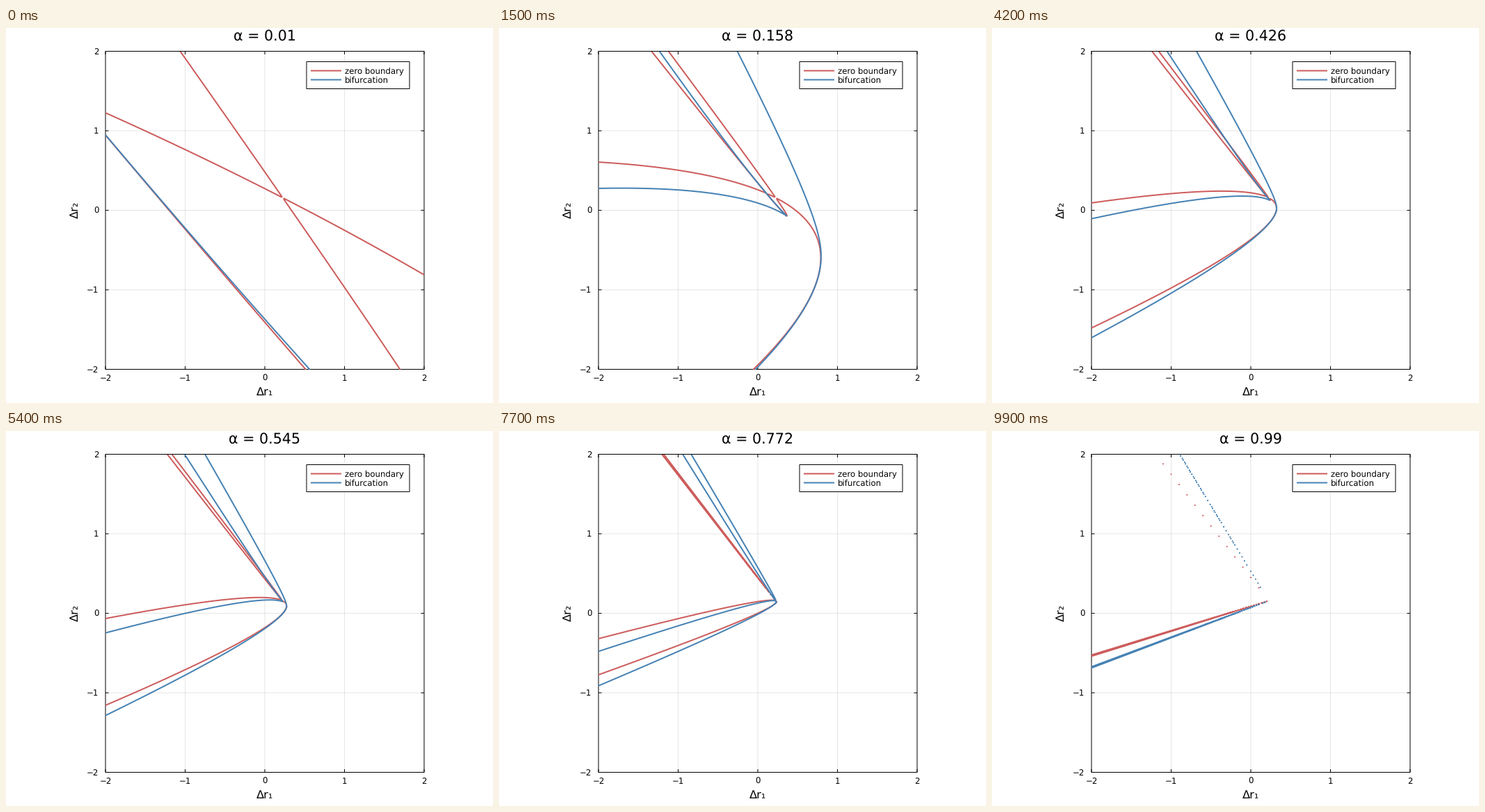
A matplotlib script that plays this animation: 700 px wide and 540 px high, repeating every 10000 ms.

```python
import matplotlib.pyplot as plt
import numpy as np
from matplotlib.animation import FuncAnimation
from matplotlib.collections import LineCollection
from matplotlib.patches import Rectangle

W, H, DPI = 700, 540, 100
RED, BLUE = "indianred", "steelblue"
FRAMES = 100
ALPHAS = np.linspace(0.01, 0.99, FRAMES)

# Quadratic map: P = P0 + S (U1 s + W1 s^2 + U2 t + W2 t^2 + Z s t)
P0 = np.array([0.225, 0.1576])
U1, W1 = np.array([0.3602, -0.52]), np.array([-1.0, 1.3])
U2, W2 = np.array([0.7114, -0.3657]), np.array([-1.0, -0.31])
Z = np.array([-1.147, 0.236])

grid = np.linspace(-2, 2, 401)
X, Y = np.meshgrid(grid, grid)
DX, DY = X - P0[0], Y - P0[1]


def cross(a, b):
    return a[0] * b[1] - a[1] * b[0]


def parabola(u, w, scale):
    """Implicit form of P0 + scale (u t + w t^2)."""
    d = (DX, DY)
    return cross(w, d) ** 2 + scale * cross(w, u) * cross(u, d)


def mul(*polys):
    out = np.array([1.0])
    for p in polys:
        out = np.polymul(out, p)
    return out


# Pencil of the two conics, as polynomials in the pencil parameter
DET = mul(W1, W2) - mul(Z, Z) / 4
LIN = (mul(U1, U1, W2) - mul(U1, U2, Z) + mul(U2, U2, W1)) / 4


def tangency(scale):
    """Discriminant of the pencil's cubic: zero where two solutions merge."""
    q = scale * LIN
    a = -DET[0] * DX - q[0]
    b = -DET[0] * DY - DET[1] * DX - q[1]
    c = -DET[1] * DY - DET[2] * DX - q[2]
    d = -DET[2] * DY - q[3]
    ac, bd, ad = a * c, b * d, a * d
    bc = b * c
    return 18 * ad * bc - 4 * b * b * bd + bc * bc - 4 * ac * c * c - 27 * ad * ad


plt.rcParams.update({"font.family": "DejaVu Sans", "text.hinting": "none"})
fig = plt.figure(figsize=(W / DPI, H / DPI), dpi=DPI, facecolor="white")

LEFT, TOP, SIDE = 143, 33.5, 458
RIGHT, BOTTOM = LEFT + SIDE, TOP + SIDE
UNIT = SIDE / 4
MID_X, MID_Y = LEFT + SIDE / 2, TOP + SIDE / 2
TICK = 4.5


def px(n):
    """Pixels to points."""
    return n * 72 / DPI


def canvas(z):
    """Full-stage axes measured in pixels from the top left."""
    c = fig.add_axes([0, 0, 1, 1], zorder=z)
    c.set_xlim(0, W)
    c.set_ylim(H, 0)
    c.axis("off")
    return c


def line(c, x, y, color="black", width=1, **kw):
    c.plot(x, y, color=color, linewidth=px(width), solid_capstyle="butt",
           snap=False, **kw)


def box(c, x, y, w, h, fill):
    c.add_patch(Rectangle((x, y), w, h, facecolor=fill, edgecolor="black",
                          linewidth=px(1), snap=False, zorder=1))


def label(c, x, y, s, size, **kw):
    return c.text(x, y, s, fontsize=px(size), va="baseline", **kw)


# Frame, grid, ticks and labels
base = canvas(0)
box(base, LEFT, TOP, SIDE, SIDE, "white")
for v in range(-2, 3):
    x, y = MID_X + v * UNIT, MID_Y - v * UNIT
    if abs(v) < 2:
        line(base, [x, x], [TOP, BOTTOM], alpha=0.1)
        line(base, [LEFT, RIGHT], [y, y], alpha=0.1)
    for edge, inner in [(TOP, TOP + TICK), (BOTTOM, BOTTOM - TICK)]:
        line(base, [x, x], [edge, inner])
    for edge, inner in [(LEFT, LEFT + TICK), (RIGHT, RIGHT - TICK)]:
        line(base, [edge, inner], [y, y])
    s = str(v).replace("-", "\u2212")
    label(base, x, 507.6, s, 11.8, ha="center")
    label(base, 133.5, y + 4.1, s, 11.8, ha="right")
label(base, MID_X, 529, "Δr₁", 16.2, ha="center")
label(base, 104, MID_Y - 1, "Δr₂", 16.2, ha="center", rotation=90,
      rotation_mode="anchor")
title = label(base, MID_X, 18, "", 20.6, ha="center")

# Plot area for the curves
ax = fig.add_axes([LEFT / W, 1 - BOTTOM / H, SIDE / W, SIDE / H], zorder=1)
ax.set_xlim(-2, 2)
ax.set_ylim(-2, 2)
ax.axis("off")

# Legend
key = canvas(2)
box(key, 432, 48.5, 148, 39, "white")
for y, color, name in [(61.5, RED, "zero boundary"), (74.5, BLUE, "bifurcation")]:
    line(key, [438, 482], [y, y], color, 2)
    label(key, 487, y + 4.5, name, 11.8)

curves = []


def draw_zero(field, color):
    cs = ax.contour(X, Y, field, levels=[0])
    segs = cs.allsegs[0]
    cs.remove()
    # Open strokes keep the tiny loops visible as dots
    lines = LineCollection(segs, colors=color, linewidths=px(2),
                           capstyle="round", joinstyle="round", snap=False)
    curves.append(ax.add_collection(lines, autolim=False))


def update(i):
    while curves:
        curves.pop().remove()
    alpha = ALPHAS[i]
    scale = (1 - alpha) ** 2 / alpha
    draw_zero(parabola(U1, W1, scale) * parabola(U2, W2, scale), RED)
    draw_zero(tangency(scale), BLUE)
    title.set_text(f"α = {round(float(alpha), 3)}")
    return curves + [title]


anim = FuncAnimation(fig, update, frames=FRAMES, interval=100,
                     repeat=True, repeat_delay=0, blit=False)
plt.show()
```
